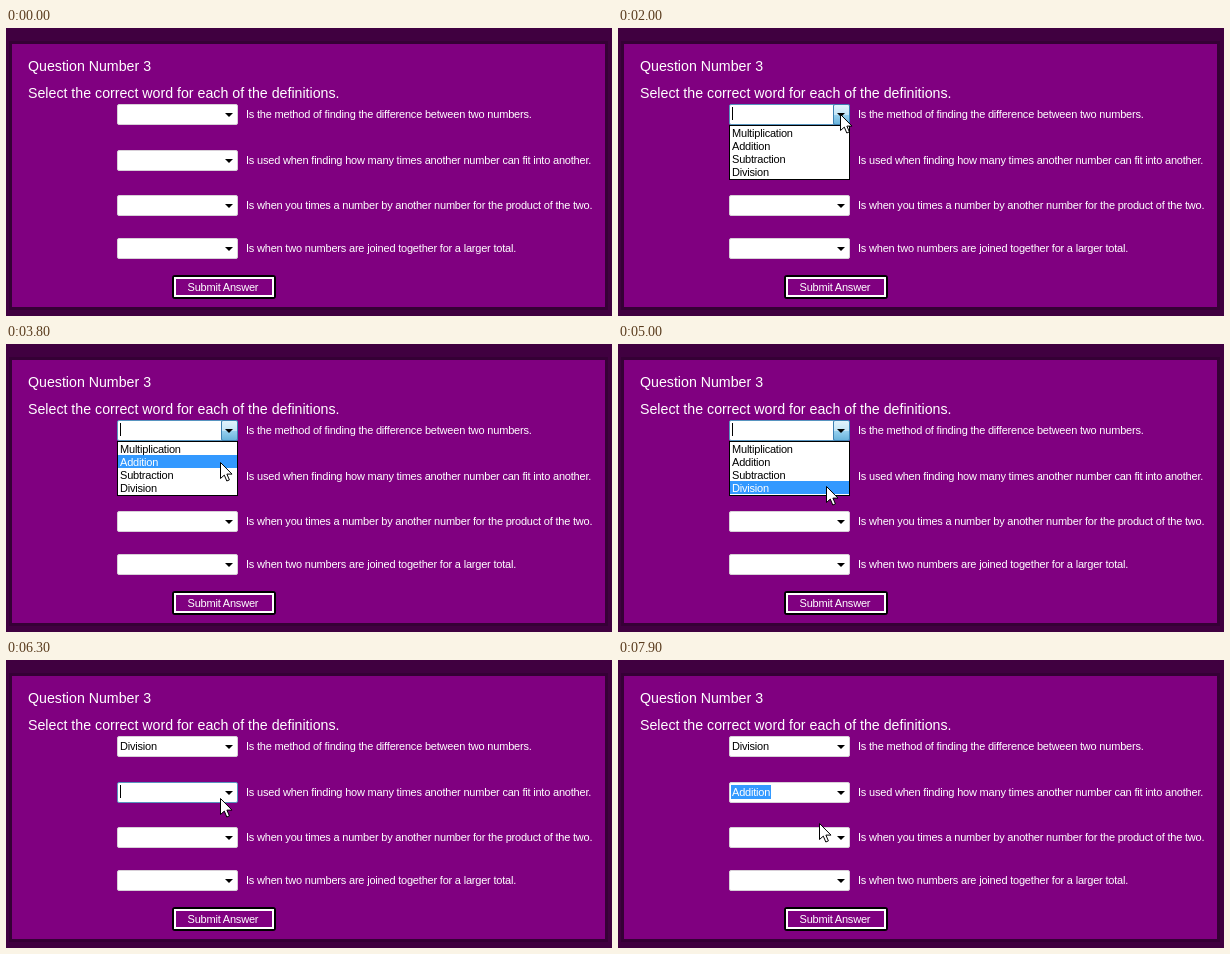
An HTML page for the animation above (8000 ms loop, 606x288 px).

```html
<!DOCTYPE html>
<html lang="en">
<head>
<meta charset="utf-8">
<title>Word quiz</title>
<style>
  html, body { margin: 0; width: 100%; height: 100%; overflow: hidden; background: #400040; }
  svg { display: block; width: 606px; height: 288px; }
  text { font: 11px "Liberation Sans", Arial, sans-serif; letter-spacing: -.2px; white-space: pre; }
  .head { font-size: 14.2px; letter-spacing: 0; }
</style>
</head>
<body>
<svg id="stage" viewBox="0 0 606 288">
  <defs>
    <linearGradient id="hot" x2="0" y2="1">
      <stop offset="0" stop-color="#e3f4fc"/>
      <stop offset=".5" stop-color="#c4e5f6"/>
      <stop offset=".51" stop-color="#98d1ef"/>
      <stop offset="1" stop-color="#68b3db"/>
    </linearGradient>
  </defs>
</svg>
<script>
const LOOP = 8000, STEP = 100;
const WORDS = ["Multiplication", "Addition", "Subtraction", "Division"];
const ROWS = [
  [76, "Is the method of finding the difference between two numbers."],
  [122, "Is used when finding how many times another number can fit into another."],
  [167, "Is when you times a number by another number for the product of the two."],
  [210, "Is when two numbers are joined together for a larger total."]
];
const ITEM = 13, BLUE = "#3399ff";

// Pointer stops: time, x, y
const PATH = [
  [500, 300, 290], [1400, 222, 86], [2500, 222, 86], [3100, 218, 104],
  [3500, 214, 118], [4000, 214, 118], [4400, 211, 130], [4800, 208, 142],
  [5600, 208, 142], [6100, 214, 138], [6500, 214, 138], [6800, 217, 139],
  [7100, 217, 139], [7500, 201, 163], [8000, 201, 163]
];
// What happens to each drop-down, in ms
const MENUS = [
  { focus: 1700, open: 1700, pick: 5400, blur: 6200, answer: "Division" },
  { focus: 6200, open: 6800, pick: 7700, blur: LOOP, answer: "Addition" }
];

const stage = document.getElementById("stage");

function add(parent, tag, attrs, content) {
  const el = document.createElementNS("http://www.w3.org/2000/svg", tag);
  for (const key in attrs) el.setAttribute(key, attrs[key]);
  if (content) el.textContent = content;
  return parent.appendChild(el);
}
const rect = (parent, x, y, width, height, fill, extra) =>
  add(parent, "rect", { x, y, width, height, fill, ...extra });
const label = (parent, x, y, content, fill, extra) =>
  add(parent, "text", { x, y, fill, ...extra }, content);
const show = (el, on) => el.setAttribute("visibility", on ? "visible" : "hidden");

function makeCombo(y) {
  const box = rect(stage, 111.5, y + .5, 120, 20, "#fff", { rx: 1.5, stroke: "#d8cfd8" });
  const button = rect(stage, 215.5, y + .5, 16, 20, "url(#hot)", { rx: 1.5, stroke: "#3c7fb1" });
  add(stage, "path", { d: `M219 ${y + 9}h8l-4 4z`, fill: "#000" });
  const mark = rect(stage, 113, y + 3, 40, 14, BLUE);
  const value = label(stage, 114, y + 14, "", "#000");
  const caret = rect(stage, 114, y + 3, 1, 13, "#000");
  return { y, box, button, mark, value, caret };
}

function makeList(y) {
  const group = add(stage, "g");
  rect(group, 111.5, y + .5, 120, 54, "#fff", { stroke: "#000" });
  const bar = rect(group, 112, y, 119, ITEM, BLUE);
  const items = WORDS.map((word, i) => label(group, 114, y + 12 + i * ITEM, word, "#000"));
  return { y, group, bar, items };
}

rect(stage, 0, 0, 606, 288, "#400040");
rect(stage, 4.5, 14.5, 596, 266, "none", { stroke: "#350035", "stroke-width": 3 });
rect(stage, 6, 16, 593, 263, "#800080");
label(stage, 22, 43, "Question Number 3", "#fff", { class: "head" });
label(stage, 22, 70, "Select the correct word for each of the definitions.", "#fff", { class: "head" });
rect(stage, 167, 248, 102, 22, "none", { rx: 2, stroke: "#000", "stroke-width": 2 });
rect(stage, 169, 250, 98, 18, "#800080", { stroke: "#fff", "stroke-width": 2 });
label(stage, 181.5, 263, "Submit Answer", "#fff");

const combos = ROWS.map(([y, definition]) => {
  label(stage, 240, y + 14, definition, "#fff");
  return makeCombo(y);
});
const lists = MENUS.map((menu, i) => makeList(ROWS[i][0] + 21));
const pointer = add(stage, "path", {
  d: "M0 0V16L3.8 12.6 6.3 18.5 8.9 17.4 6.4 11.6H11.5Z",
  fill: "#fff", stroke: "#000", "stroke-linejoin": "round"
});

function pointerAt(t) {
  const next = PATH.findIndex(p => p[0] > t);
  if (next < 1) return null;
  const [t0, x0, y0] = PATH[next - 1], [t1, x1, y1] = PATH[next];
  const u = (t - t0) / (t1 - t0), k = u * u * (3 - 2 * u);
  return { x: x0 + (x1 - x0) * k, y: y0 + (y1 - y0) * k };
}

function drawCombo(combo, menu, t) {
  const on = menu && t >= menu.focus && t < menu.blur;
  const picked = menu && t >= menu.pick;
  const open = menu && t >= menu.open && !picked;
  combo.box.setAttribute("stroke", on && !picked ? "#5794bf" : "#d8cfd8");
  show(combo.button, open);
  show(combo.caret, on && t < menu.pick && !(menu === MENUS[1] && open));
  show(combo.mark, on && picked);
  combo.value.textContent = picked ? menu.answer : "";
  combo.value.setAttribute("fill", on ? "#fff" : "#000");
}

function drawList(list, menu, t, spot) {
  const open = t >= menu.open && t < menu.pick;
  show(list.group, open);
  if (!open) return show(list.bar, false);
  const hover = Math.floor((spot.y - list.y - 1) / ITEM);
  show(list.bar, hover >= 0);
  list.bar.setAttribute("y", list.y + 1 + hover * ITEM);
  list.items.forEach((item, i) => item.setAttribute("fill", i === hover ? "#fff" : "#000"));
}

function draw(t) {
  const spot = pointerAt(t);
  combos.forEach((combo, i) => drawCombo(combo, MENUS[i], t));
  lists.forEach((list, i) => drawList(list, MENUS[i], t, spot));
  show(pointer, spot);
  if (spot) pointer.setAttribute("transform", `translate(${Math.round(spot.x) + .5} ${Math.round(spot.y) + .5})`);
}

const start = performance.now();
function tick() {
  const t = (performance.now() - start) % LOOP;
  draw(Math.floor(t / STEP) * STEP);
  requestAnimationFrame(tick);
}
tick();
</script>
</body>
</html>
```
